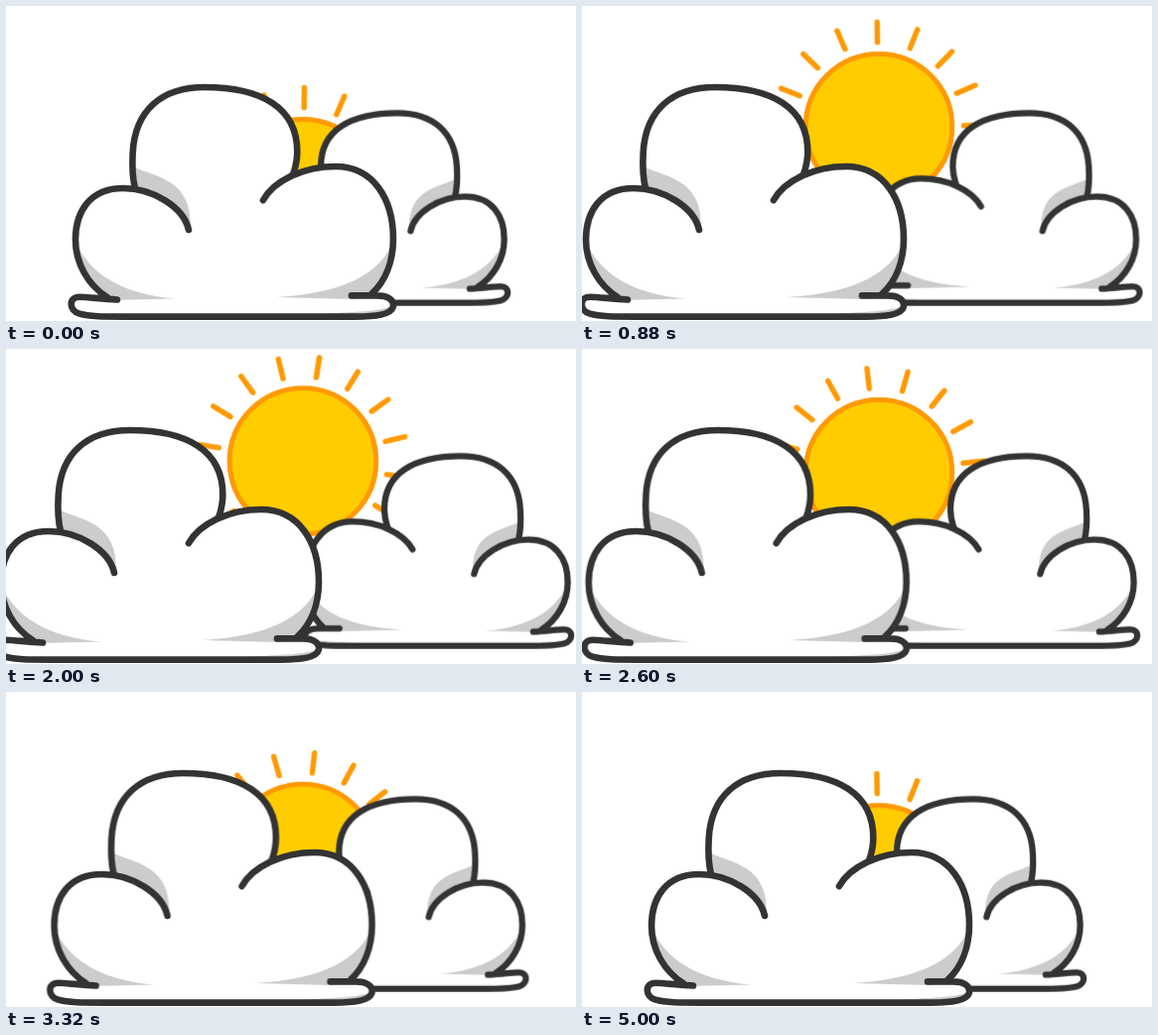
An HTML page for the animation above (5.04 s loop, 574 by 318 pixels).

```html
<!DOCTYPE html>
<html lang="en">
<head>
<meta charset="utf-8">
<title>Sun behind clouds</title>
<style>
  html, body { margin: 0; width: 100%; height: 100%; overflow: hidden; background: #fff; }
  svg { display: block; width: 574px; height: 318px; }

  .move { animation: part 5040ms linear infinite; }
  .sun { --to: translate(0, -75px); }
  .front { --to: translate(-75px, 0); }
  .back { --to: translate(64px, 0); }
  .rays { animation: spin 5040ms linear infinite; }

  /* open in 1000 ms, hold until 2400 ms, close by 3690 ms */
  @keyframes part {
    0%, 73.21%, 100% { transform: translate(0, 0); }
    19.84%, 47.62% { transform: var(--to); }
  }
  /* eleven ray steps of 22.5deg per loop */
  @keyframes spin {
    from { transform: rotate(0.8deg); }
    to { transform: rotate(248.3deg); }
  }

  .disc { fill: #fc0; stroke: #f90; stroke-width: 5; }
  .rays { stroke: #f90; stroke-width: 5.4; stroke-linecap: round; }
  .white { fill: #fff; stroke: none; }
  .body { fill: #fff; stroke: #fff; stroke-width: 4; }
  .shade { fill: #ccc; stroke: none; }
  .line { fill: none; stroke: #333; stroke-linecap: round; stroke-linejoin: round; }
  .front { stroke-width: 6.6; }
  .back { stroke-width: 7.6; }
</style>
</head>
<body>
<svg viewBox="0 0 574 318">
  <defs>
    <path id="lobes" d="
      M130 184 C127 172 127 160 127.7 148 C130 105 157 82 200 82 C258 82 293.3 103 293.3 147 C293.3 157 291.5 163 289.5 169
      M184 226 C179 203 148 184 118 184 C85 184 70 207 70 236 C70 260 83 282 102 294
      M259 196 C270 176 300 162 332 162 C370 162 390 195 390 235 C390 258 382 278 368 291
      M112 296.5 C95 295.5 82 293.7 74 293.7 C63 293.7 63 307.5 74 310.7 C84 313.6 98 313.6 120 313.6
      H352 C372 313.6 388 311.5 390 303.5 C391 296.5 384 292.4 374 292.4 H348"/>
    <g id="cloud">
      <path class="body" d="M130 184 L184 226 L105 294 L367 293 L259 196 L289 170 Z"/>
      <use href="#lobes" class="white"/>
      <g class="shade">
        <path d="M128 162 C150 173 186 174 186 221 L184 226 C177 203 150 187 130 184 Z"/>
        <path d="M293 155 C290 165 282 172 270 179 L291 169 Z"/>
        <path d="M70 238 C83 268 114 291 171 295.5 L105 297 C83 282 70 260 70 238 Z"/>
        <path d="M390 237 C378 270 340 290 273 294 L350 296 L368 292 C382 278 390 258 390 237 Z"/>
        <path d="M390 301 C384 307 368 308.5 320 310.3 L352 313 C372 313 388 311 390 301 Z"/>
      </g>
      <use href="#lobes" class="line"/>
    </g>
  </defs>

  <g class="move sun">
    <g transform="translate(298.9 188.2)">
      <g class="rays" id="rays"></g>
      <circle class="disc" r="73.8"/>
    </g>
  </g>
  <g class="move back">
    <use href="#cloud" transform="matrix(-.827 0 0 .827 559.6 40.2)"/>
  </g>
  <g class="move front">
    <use href="#cloud"/>
  </g>
</svg>
<script>
  const rays = document.getElementById('rays');
  for (let i = 0; i < 16; i++) {
    const ray = document.createElementNS('http://www.w3.org/2000/svg', 'line');
    ray.setAttribute('y1', -85.6);
    ray.setAttribute('y2', -105.8);
    ray.setAttribute('transform', `rotate(${i * 22.5})`);
    rays.append(ray);
  }
</script>
</body>
</html>
```
